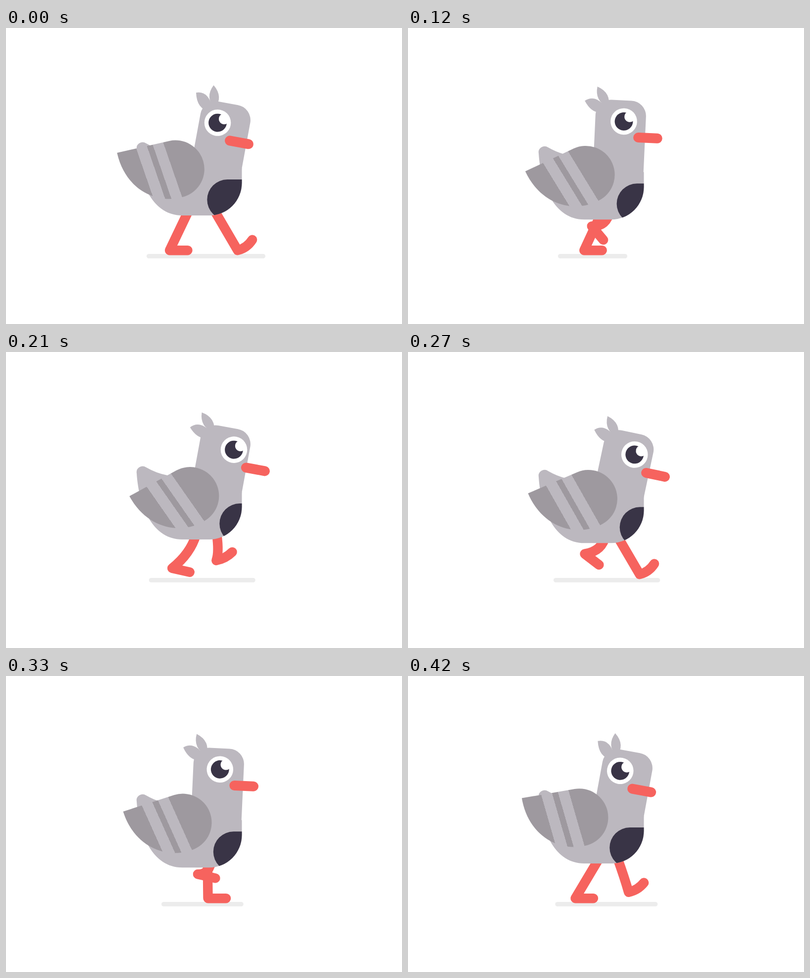
An HTML page for the animation above (450 ms loop, 800 by 600 pixels).

```html
<!DOCTYPE html>
<html lang="en">
<head>
<meta charset="utf-8">
<title>Walking pigeon</title>
<style>
  html, body { margin: 0; width: 100%; height: 100%; overflow: hidden; background: #fff; }
  svg { display: block; width: 800px; height: 600px; }
  .grey { fill: #bcb8bf; }
  .dark { fill: #393446; }
  .white { fill: #fff; }
  .line { fill: none; stroke: #f6635e; stroke-linecap: round; stroke-linejoin: round; }
</style>
</head>
<body>
<svg viewBox="0 0 800 600">
  <defs>
    <path id="torso" d="M264 246 C268 310 295 380 356 380 H410.5 A66 66 0 0 0 476.5 314 V284 L400 254 L326 250 Q304 246 283 233.8 A12.2 12.2 0 0 0 264 246Z"/>
    <clipPath id="inTorso"><use href="#torso"/></clipPath>
    <linearGradient id="stripes" gradientUnits="userSpaceOnUse" x1="-100" x2="0" y1="0" y2="0">
      <stop offset=".385" stop-color="#9e999f"/><stop offset=".385" stop-color="#bcb8bf"/>
      <stop offset=".605" stop-color="#bcb8bf"/><stop offset=".605" stop-color="#9e999f"/>
      <stop offset=".725" stop-color="#9e999f"/><stop offset=".725" stop-color="#bcb8bf"/>
      <stop offset=".94" stop-color="#bcb8bf"/><stop offset=".94" stop-color="#9e999f"/>
    </linearGradient>
  </defs>

  <rect id="shadow" y="458" height="9" rx="4.5" fill="#ececec"/>
  <path id="legA" class="line" stroke-width="19.4"/>
  <path id="legB" class="line" stroke-width="19.4"/>

  <g id="bird">
    <use href="#torso" class="grey"/>
    <g id="head">
      <path class="grey" d="M38.9 20 V-109 a31 31 0 0 1 31-31 H110 a31 31 0 0 1 31 31 V20Z"/>
      <g id="crest" class="grey">
        <path d="M22.4-149.5 Q46-158 60-126 L56-118 Q30-116 22.4-149.5Z"/>
        <path d="M54.6-170.7 Q79-151 65-124 Q41-144 54.6-170.7Z"/>
      </g>
      <g id="face">
        <circle class="white" cy="-97.3" r="26.8"/>
        <circle class="dark" cy="-97.3" r="18.4"/>
        <circle class="white" cx="11.7" cy="-107.4" r="10.9"/>
        <path class="line" stroke-width="20" d="M30.6-66 H69.2"/>
      </g>
    </g>
    <g clip-path="url(#inTorso)">
      <path id="chest" class="dark" d="M80-41 H0 a41 41 0 0 0 0 82 H80Z"/>
    </g>
    <path id="wing" fill="url(#stripes)" d="M-101-69.6 L6.6-58.1 A58.5 58.5 0 0 1 0 58.5 C-55 58.5-110 10-101-69.6Z"/>
  </g>
</svg>
<script>
  const STEP = 30, STEPS = 15, STRIDE = 7, LIFT_OFF = 6;
  const el = id => document.getElementById(id);
  const set = (id, name, value) => el(id).setAttribute(name, value);

  // Linear keyframes: [step, value] pairs.
  function track(k, keys) {
    const i = keys.findIndex(([at]) => at > k);
    const [a, from] = keys[i - 1], [b, to] = keys[i];
    return from + (to - from) * (k - a) / (b - a);
  }

  // The heel slides back on the ground, then arcs forward through the air.
  function legPath(k) {
    const u = Math.min(k / LIFT_OFF, 1);
    const v = Math.max(0, (k - LIFT_OFF) / (STEPS - LIFT_OFF));
    const back = u * (1.32 - 0.32 * u ** 3) - v ** 1.5;
    const lift = 50 * Math.sin(Math.PI * v) ** 1.3;
    const knee = 15 * Math.sin(Math.PI * Math.sqrt(v));
    const hip = track(k, [[0, 421], [5, 386], [6, 369], [7, 384], [12.5, 427], [15, 421]]);
    const pitch = track(k, [[0, -36], [1.5, 0], [6, 0], [10, 50], [11, 13], [13, -28], [15, -36]]);

    const x = 468 - 137.5 * back, y = 450.7 - lift;
    const angle = pitch * Math.PI / 180, cos = Math.cos(angle), sin = Math.sin(angle);
    const point = (along, down) => `${x + along * cos - down * sin} ${y + along * sin + down * cos}`;
    const curl = Math.max(0, -pitch) * 0.2;
    return `M${hip} 370 Q${(hip + x) / 2 + knee} ${(370 + y) / 2 + lift * 0.35} ${x} ${y}` +
      `Q${point(18, curl)} ${point(36.5, 0)}`;
  }

  function draw(k) {
    const m = k % STRIDE;
    const bob = track(m, [[0, 0], [3, 11], [7, 0]]);
    const nod = track(m, [[0, 10.4], [1, 16.7], [5, -2.1], [7, 10.4]]);
    const swing = track(k, [[0, 0], [7, 1], [15, 0]]);
    const sway = (1 - Math.cos(Math.PI * swing)) / 2;
    const tilt = track(k, [[0, 19], [6, 37.6], [14, 16], [15, 19]]);
    const left = track(k, [[0, 284], [4, 303], [8, 284], [12, 324], [15, 284]]);
    const right = track(k, [[0, 524], [4, 443], [8, 524], [12, 465], [15, 524]]);

    set('shadow', 'x', left);
    set('shadow', 'width', right - left);
    set('legA', 'd', legPath((k + 6) % STEPS));
    set('legB', 'd', legPath(k));
    set('bird', 'transform', `translate(0 ${bob})`);
    set('head', 'transform', `translate(335 274) rotate(${nod})`);
    set('crest', 'transform', `rotate(${-29 * sway} 64 -122)`);
    set('face', 'transform', `translate(${76.2 + 33.5 * sway} 0)`);
    set('chest', 'transform', `translate(${447.3 + 25 * sway} 348)`);
    set('wing', 'transform',
      `translate(${342.5 + 29.5 * swing} ${286 + 5.5 * swing}) rotate(${-tilt})`);
  }

  function tick() {
    draw(Math.floor(performance.now() / STEP) % STEPS);
    requestAnimationFrame(tick);
  }
  tick();
</script>
</body>
</html>
```
